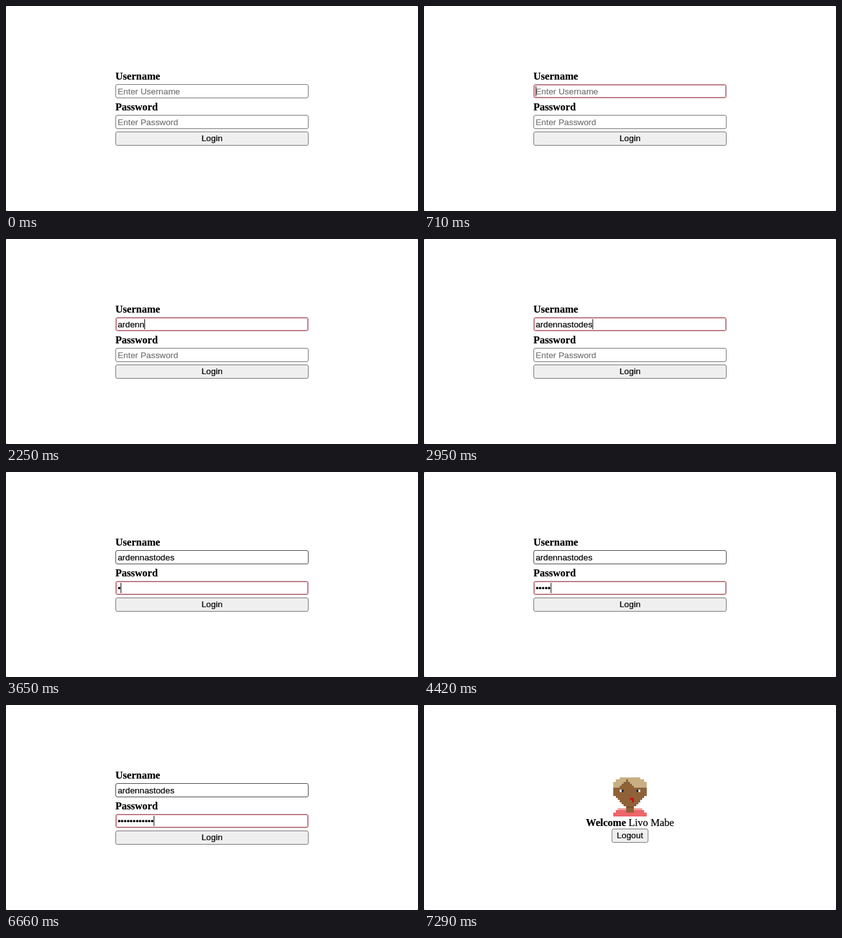
Recreate the animation shown at these times as an HTML page. Size 640 by 320 pixels, loop 8 s.

```html
<!DOCTYPE html>
<html lang="en">
<head>
<meta charset="utf-8">
<title>Login form</title>
<style>
  html, body { margin: 0; height: 100%; overflow: hidden; background: #888; }
  svg { display: block; width: 640px; height: 320px; background: #fff; border-radius: 2px; }
  text {
    font: 13.333px "Liberation Sans", Arial, sans-serif; white-space: pre;
    fill: currentColor; stroke: currentColor; stroke-width: .2px;
  }
  .serif { font: 16px "Liberation Serif", Times, serif; }
  .bold { font-weight: bold; }
  .mid { text-anchor: middle; }
  .box { fill: #fff; stroke: #767676; }
  .hover .box { stroke: #4a4a4a; }
  .ring { fill: none; stroke: #c9747e; visibility: hidden; }
  .focus .box { stroke: #b5868c; }
  .focus .ring { visibility: visible; }
  .button { fill: #efefef; stroke: #767676; }
  .hint { color: #757575; }
</style>
</head>
<body>
<svg viewBox="0 0 640 320">
  <g id="login">
    <text class="serif bold" x="170" y="115">Username</text>
    <g id="user"></g>
    <text class="serif bold" x="170" y="163">Password</text>
    <g id="pass"></g>
    <rect class="button" x="170.5" y="196.5" width="299" height="21" rx="2.5"/>
    <text class="mid" x="320" y="211">Login</text>
  </g>
  <g id="welcome">
    <g id="avatar" transform="translate(288 110) scale(3.2)" shape-rendering="crispEdges"></g>
    <text class="serif mid" x="320" y="189"><tspan class="bold">Welcome</tspan> Livo Mabe</text>
    <rect class="button" x="292" y="193.5" width="56" height="21" rx="2.5"/>
    <text class="mid" x="320" y="208">Logout</text>
  </g>
</svg>
<script>
const LOOP = 8000, STEP = 70;
const NAME = 'ardennastodes';
const HOVER = 500, FOCUS = 710, TAB = 3160, DONE = 7290;
const $ = id => document.getElementById(id);

function add(parent, tag, attrs) {
  const el = document.createElementNS('http://www.w3.org/2000/svg', tag);
  for (const key in attrs) el.setAttribute(key, attrs[key]);
  return parent.appendChild(el);
}

function makeField(id, y, hint) {
  const group = $(id);
  add(group, 'rect', { class: 'box', x: 170.5, y: y + .5, width: 299, height: 21, rx: 2.5 });
  add(group, 'rect', { class: 'ring', x: 171.5, y: y + 1.5, width: 297, height: 19, rx: 1.5 });
  const label = add(group, 'text', { x: 173.4, y: y + 15.5 });
  const caret = add(group, 'rect', { y: y + 3, width: 1, height: 16 });
  return (value, hover, focus, caretOn) => {
    group.classList.toggle('hover', hover);
    group.classList.toggle('focus', focus);
    label.classList.toggle('hint', !value);
    label.textContent = value || hint;
    const width = value ? label.getComputedTextLength() : 0;
    caret.setAttribute('x', 173.4 + width);
    caret.setAttribute('visibility', focus && caretOn ? 'visible' : 'hidden');
  };
}

// Colour of one cell of the mirrored 20 x 20 portrait
function portrait(x, y) {
  const side = Math.abs(x - 9.5);
  const skin = '#8f6239';
  if (y > 14) {
    if (side < 2 && y < 18) return y === 15 ? '#7d5430' : skin;
    if (y === 15 || side > Math.min(8, y - 10)) return null;
    return y === 16 ? '#f0a3a2' : '#ee656b';
  }
  if (side >= Math.min(8, 4 + 1.5 * y, 17.5 - y)) return null;
  if (y <= Math.min(5, 1 + Math.abs(x - 8))) return '#c8b084';
  if (y === 7 && side === 3.5) return '#2b2b38';
  if (y === 7 && side === 4.5) return '#f4f4f4';
  if ((y === 11 || y === 12) && x < 12 && x >= y - 1) return '#c3140f';
  return skin;
}

for (let y = 1; y < 20; y++)
  for (let x = 2; x < 18; x++) {
    const fill = portrait(x, y);
    if (fill) add($('avatar'), 'rect', { x, y, width: 1, height: 1, fill });
  }

const drawUser = makeField('user', 122, 'Enter Username');
const drawPass = makeField('pass', 170, 'Enter Password');
const within = (t, from, to) => t >= from && t < to;

// Keys pressed by time t when n keys are spread evenly from first to last
function typed(t, first, last, n) {
  const keys = Math.floor((t + STEP - 10 - first) / (last - first) * (n - 1)) + 1;
  return Math.max(0, Math.min(n, keys));
}

function draw(time) {
  const t = Math.floor((time - 10) / STEP) * STEP + 10; // the screen updates every STEP ms
  const caretOn = !(within(t, 1270, 1690) || within(t, 6170, 6660) || t >= 7220);
  const dots = typed(t, 3650, 4420, 5) + typed(t, 4700, 5610, 7);
  drawUser(NAME.slice(0, typed(t, 1690, 2950, NAME.length)), t >= HOVER, within(t, FOCUS, TAB), caretOn);
  drawPass('•'.repeat(dots), false, t >= TAB, caretOn);
  $('login').style.display = t < DONE ? '' : 'none';
  $('welcome').style.display = t < DONE ? 'none' : '';
}

const start = performance.now();
function tick(now) {
  draw(Math.max(0, now - start) % LOOP);
  requestAnimationFrame(tick);
}
tick(start);
</script>
</body>
</html>
```
